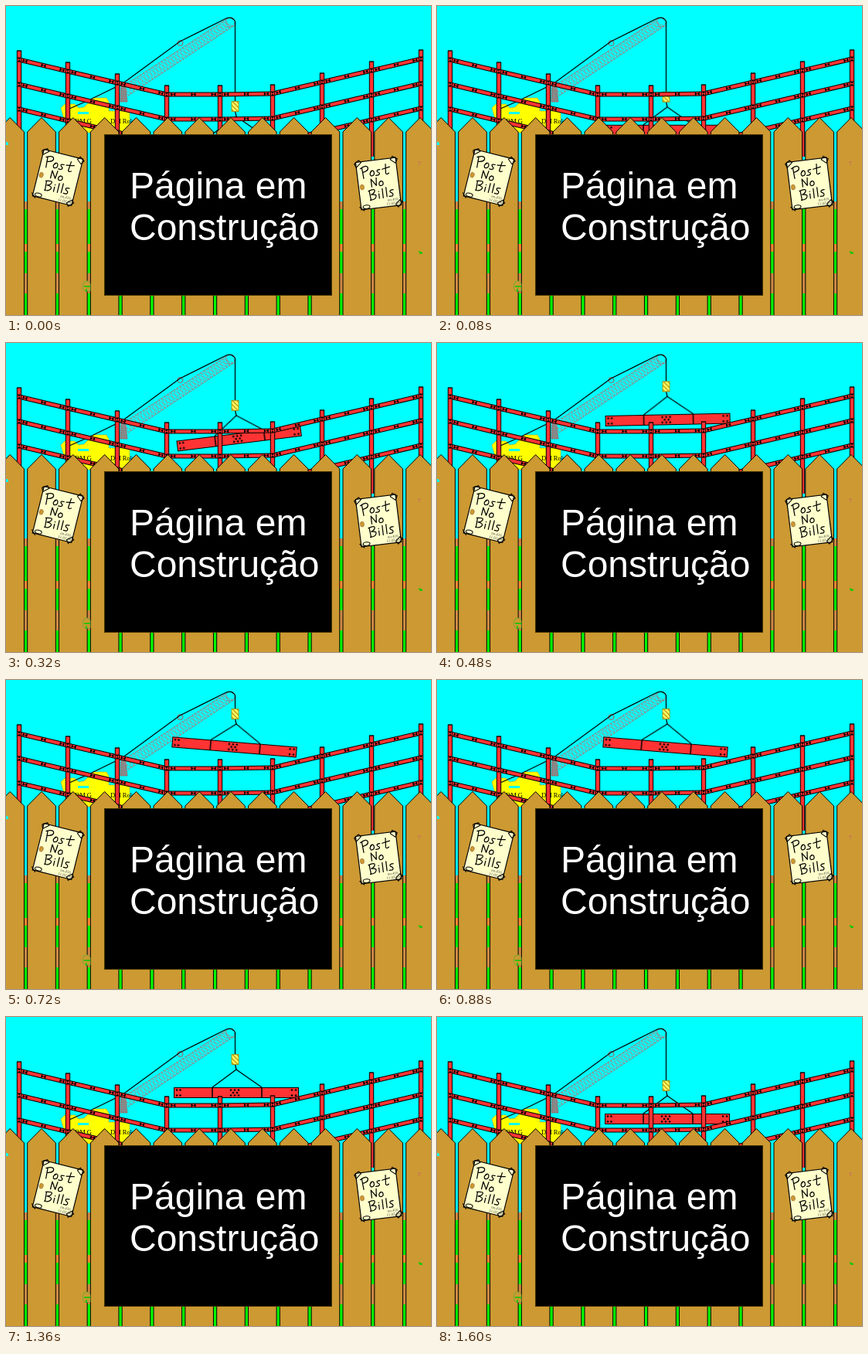
An HTML page that plays this animation: 550x400 px, repeating every 1680 ms.

```html
<!DOCTYPE html>
<html lang="pt">
<head>
<meta charset="utf-8">
<title>Página em Construção</title>
<style>
html, body { margin: 0; width: 100%; height: 100%; overflow: hidden; background: #0ff; }
svg { display: block; width: 550px; height: 400px; }
.load, .beam { animation: lift 1680ms -4ms infinite; }
.beam { animation-name: swing; transform-origin: 298px 57px; }
@keyframes lift {
  0% { transform: translateY(86px); animation-timing-function: steps(7, end); }
  33.333% { transform: translateY(0); animation-timing-function: step-end; }
  71.429% { transform: translateY(0); animation-timing-function: steps(2, end); }
  80.952% { transform: translateY(11px); animation-timing-function: steps(3, end); }
  95.238% { transform: translateY(45px); animation-timing-function: step-end; }
  100% { transform: translateY(45px); }
}
@keyframes swing {
  0% { transform: rotate(0deg); animation-timing-function: step-end; }
  9.524% { transform: rotate(0deg); animation-timing-function: steps(2, end); }
  19.048% { transform: rotate(-7deg); animation-timing-function: steps(2, end); }
  28.571% { transform: rotate(-1.2deg); animation-timing-function: step-end; }
  33.333% { transform: rotate(0deg); animation-timing-function: steps(3, end); }
  47.619% { transform: rotate(7deg); animation-timing-function: steps(3, end); }
  61.905% { transform: rotate(0deg); animation-timing-function: step-end; }
  85.714% { transform: rotate(5deg); animation-timing-function: steps(2, end); }
  95.238% { transform: rotate(0deg); animation-timing-function: step-end; }
  100% { transform: rotate(0deg); }
}
.ink { fill: none; stroke: #000; }
.board { font: 48px "Liberation Sans", Arial, sans-serif; fill: #fff; }
.tiny { font: 8.5px "Liberation Serif", serif; }
.note { font: 5px "Liberation Serif", serif; text-anchor: middle; fill: #444; }
</style>
</head>
<body>
<svg viewBox="0 0 550 400">
  <defs>
    <clipPath id="under"><rect y="21" width="550" height="379"/></clipPath>
    <pattern id="hatch" width="4" height="4" patternUnits="userSpaceOnUse" patternTransform="rotate(-45)">
      <rect width="4" height="4" fill="#ff6"/><rect width="1.2" height="4" fill="#a80"/>
    </pattern>
    <g id="bill">
      <path d="M-26-31H26V31H-26Z" fill="#ffc" stroke="#000" stroke-width="1.2"/>
      <g class="ink" stroke-width="1.1">
        <path d="M-28-29l6-4l3 3l-7 6ZM22-33l6 4l-3 5l-6-5ZM22 33l6-6l-3-3l-6 5ZM-28 27l6 6"/>
        <ellipse cx="-19" cy="28" rx="4.5" ry="2.3" stroke-width="1"/>
      </g>
      <ellipse cx="-21.5" cy="2" rx="2.6" ry="3.4" fill="#c93" stroke="#963" stroke-width=".6"/>
      <g class="ink" stroke-width="1.25" stroke-linecap="round" stroke-linejoin="round">
        <path d="M-19-23L-18-9M-21-22q9-5 10 0q0 4-7 5M-7-17q-4 3-1 6q5 0 4-5q-1-3-4-1M4-18q-6 0-3 3q4 2 0 4h-3M12-24l-1 12q1 2 4 0M7-18l10-2"/>
        <path d="M-9 3v-10l6 9l1-10M3-3q-4 3-1 6q5 0 4-4q-1-3-4-1"/>
        <path d="M-13 8l1 12M-14 8q9-3 8 1q-1 3-5 4q7 0 6 3q-1 4-8 4M-1 13v6M4 7v12M9 6v12M18 10q-6 0-4 3q5 2 2 5h-4M-1 10v.3"/>
      </g>
      <text class="note" x="16" y="24">no.416</text>
      <text class="note" x="16" y="29">11.02.98</text>
    </g>
  </defs>

  <rect width="550" height="400" fill="#0ff"/>
  <g id="ground"></g>

  <g id="crane">
    <path d="M71 132l5-5h13l5 5l7-1l8-8l4-4h17l3 5v12h27v28H86v-18H75Z" fill="#ff0" stroke="#c90" stroke-width=".8" stroke-dasharray="2 1"/>
    <path d="M93 137h14v3H93Z" fill="#0ff"/>
    <path d="M149 100h5l3 24h-9Z" fill="#888" stroke="#a55" stroke-dasharray="2 1"/>
    <text class="tiny" x="89" y="152">DM.G</text>
    <text class="tiny" x="135" y="152">DM Rok</text>
    <path id="lattice" fill="none" stroke="#a88" stroke-width=".7"/>
    <path d="M150 105L284 18M158 116L294 26" fill="none" stroke="#b66" stroke-dasharray="3 1"/>
    <circle cx="225.5" cy="48" r="3.5" fill="none" stroke="#a55"/>
    <path d="M284 18q9-6 13 1l-2 7l-8 1Z" fill="none" stroke="#a66" stroke-dasharray="2 1"/>
    <path class="ink" d="M82 133L107 122L150 101L225 46L283 17Q292 12 296.500 20V23" stroke-width="1.200"/>
  </g>

  <g clip-path="url(#under)">
    <g class="load">
      <path class="ink" d="M296.500-90V37M296.500 50L298 57" stroke-width="1.200"/>
      <rect x="292" y="37.500" width="9" height="13" fill="url(#hatch)" stroke="#a80" stroke-width=".8"/>
      <g class="beam">
        <path class="ink" d="M267 80L298 57L331 80" stroke-width="1.200"/>
        <rect x="217.500" y="80.500" width="161" height="13" fill="#f33" stroke="#000"/>
        <path class="ink" d="M267 80v14M331 80v14" stroke-width="1.500"/>
        <g id="rivets"></g>
      </g>
    </g>
  </g>

  <g id="scaffold"></g>
  <g id="fence" fill="#c93" stroke="#000"></g>

  <path d="M0 176q4 0 3 4h-3Z" fill="#0ff"/>
  <path d="M533 202h4M534 205h2" stroke="#c66"/>
  <path d="M534 318l5 2M535 320h3" stroke="#0c0" stroke-width="1.500"/>
  <path d="M101 357q7-3 8 3v9h-7q-5-4-1-12" fill="#c93" stroke="#7a3" stroke-width="1"/>
  <path d="M101 363h8M104 366v4" stroke="#0c0" stroke-width="1.500"/>

  <rect x="127.500" y="166.500" width="294" height="208" stroke="#430"/>
  <g class="board">
    <text x="160" y="249">Página em</text>
    <text x="160" y="303">Construção</text>
  </g>
  <use href="#bill" transform="translate(67 222) rotate(14)"/>
  <use href="#bill" transform="translate(482 230) rotate(-7)"/>
</svg>
<script>
const put = (id, html) => { document.getElementById(id).innerHTML = html; };
const line = (x1, y1, x2, y2, w, color) =>
  `<path d="M${x1} ${y1}L${x2} ${y2}" stroke="${color}" stroke-width="${w}"/>`;
const bar = (x1, y1, x2, y2, w) =>
  line(x1, y1, x2, y2, w, '#000') + line(x1, y1, x2, y2, w - 2, '#f33');
const tie = (x, y, angle) =>
  `<path d="M-3-2.5L3 2.5V-2.5L-3 2.5Z" transform="translate(${x} ${y}) rotate(${angle})"/>`;

// Coloured strips that show through the gaps of the fence
const strips = [[253, '#c84'], [263, '#0f0'], [308, '#f83'], [318, '#0f0'], [346, '#c84'], [372, '#0f0']];
put('ground', strips.map(([y, c]) => `<rect y="${y}" width="550" height="${400 - y}" fill="${c}"/>`).join(''));

// Crossed zigzags between the two chords of the boom
let zig = '';
for (const side of [0, 1]) {
  for (let i = 0; i <= 34; i++) {
    const k = i / 34;
    const [x, y] = i % 2 === side ? [158 + 136 * k, 116 - 90 * k] : [150 + 134 * k, 105 - 87 * k];
    zig += `${i ? 'L' : 'M'}${x.toFixed(1)} ${y.toFixed(1)}`;
  }
}
document.getElementById('lattice').setAttribute('d', zig);

const dots = [];
for (const y of [83.5, 90.5]) for (const x of [221, 225.5, 291, 296, 301, 370, 375]) dots.push([x, y]);
dots.push([294, 87], [299, 87]);
put('rivets', dots.map(([x, y]) => `<circle cx="${x}" cy="${y}" r="1.3"/>`).join(''));

// Posts with three rails between neighbours
const posts = [[17, 58], [80, 73], [144, 88], [208, 103], [277, 103], [345, 102], [409, 87], [473, 72], [537, 57]];
let rails = '', uprights = '', ties = '';
posts.forEach(([x, y], i) => {
  uprights += bar(x, y, x, 195, 6.4) + line(x - 3, y, x + 3, y, 1.4, '#000');
  for (let r = 0; r < 3; r++) {
    const h = 11.5 + 32 * r;
    ties += tie(x, y + h, 90);
    const next = posts[i + 1];
    if (!next) continue;
    const dx = next[0] - x, dy = next[1] - y;
    const angle = Math.atan2(dy, dx) * 180 / Math.PI;
    rails += bar(x, y + h, next[0], next[1] + h, 6);
    for (const k of [.12, .5, .88]) ties += tie(x + dx * k, y + h + dy * k, angle);
  }
});
put('scaffold', rails + uprights + ties);

let pickets = '';
for (let i = -1; i < 13; i++) {
  const x = 46 + 40.83 * i;
  pickets += `<path d="M${x - 18.3} 401V163L${x} 144.500L${x + 18.3} 163V401Z"/>`;
}
put('fence', pickets);
</script>
</body>
</html>
```
